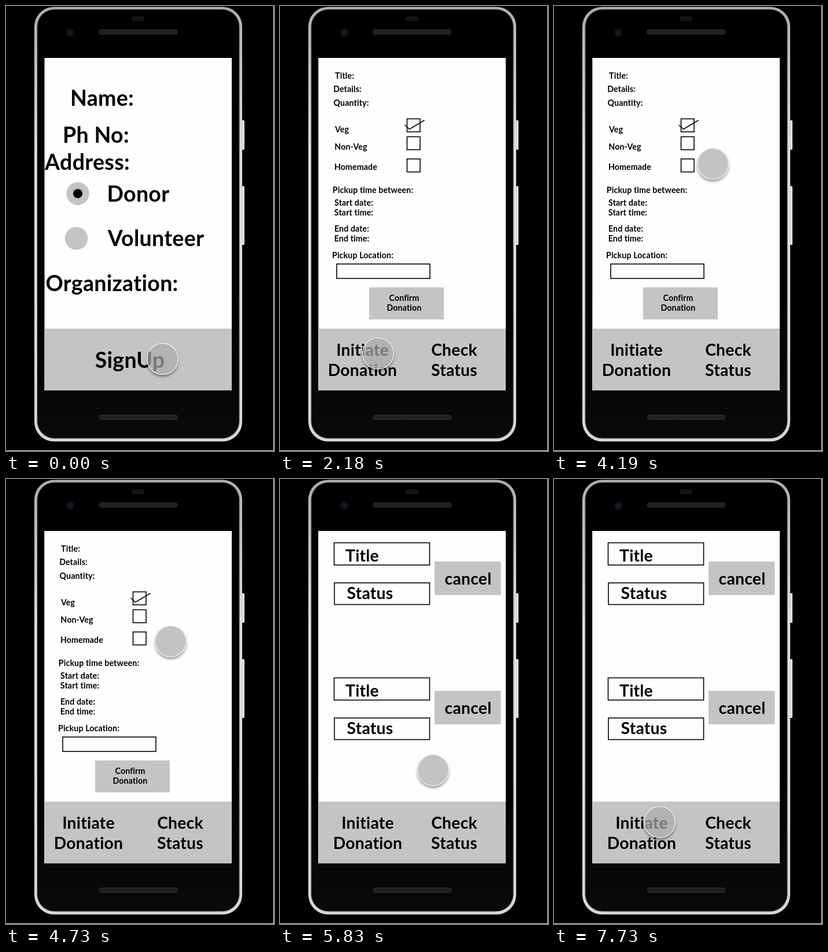
Write an HTML page with a canvas that moves like this. It is 463 px wide and 771 px high and loops after 8 s.

```html
<!DOCTYPE html>
<html lang="en">
<head>
<meta charset="utf-8">
<title>Donation app prototype</title>
<style>
html, body { margin: 0; width: 100%; height: 100%; overflow: hidden; background: #000; }
canvas { display: block; width: 463px; height: 771px; }
</style>
</head>
<body>
<canvas id="stage" width="463" height="771"></canvas>
<script>
const W = 463, H = 771, LOOP = 8000, BEAT = 140;
const GREY = '#c4c4c4';
const SMALL = 14.2, MEDIUM = 28.3, LARGE = 37.5;
const ctx = document.getElementById('stage').getContext('2d');

function layer(paint) {
  const c = document.createElement('canvas');
  c.width = W;
  c.height = H;
  paint(c.getContext('2d'));
  return c;
}

function label(g, text, x, base, size) {
  g.font = `700 ${size}px Lato, "Open Sans", sans-serif`;
  g.letterSpacing = size / 120 + 'px'; // also turns ligatures off
  g.textAlign = 'center';
  g.fillStyle = '#000';
  g.fillText(text, x, base);
}

function block(g, x, y, w, h, color = GREY) {
  g.fillStyle = color;
  g.fillRect(x, y, w, h);
}

function box(g, x, y, w, h) {
  g.strokeStyle = '#000';
  g.lineWidth = 1.6;
  g.strokeRect(x + 0.5, y + 0.5, w - 1, h - 1);
}

function disc(g, x, y, r, color) {
  g.fillStyle = color;
  g.beginPath();
  g.arc(x, y, r, 0, Math.PI * 2);
  g.fill();
}

function pill(g, x, y, w, h, r, fill) {
  g.fillStyle = fill;
  g.beginPath();
  g.roundRect(x, y, w, h, r);
  g.fill();
}

function fade(g, ...colors) {
  const shade = g.createLinearGradient(0, 0, 0, 755);
  colors.forEach((c, i) => shade.addColorStop(i / (colors.length - 1), c));
  return shade;
}

function paper(g) {
  block(g, 66.5, 90, 323.5, 576, '#fefefe');
  block(g, 66.5, 559, 323.5, 107);
}

function nav(g, x) {
  label(g, 'Initiate', x, 606, MEDIUM);
  label(g, 'Donation', x, 641, MEDIUM);
  label(g, 'Check', 301, 606, MEDIUM);
  label(g, 'Status', 301, 641, MEDIUM);
}

const phone = layer(g => {
  block(g, 0, 0, W, H, '#f4f4f4');
  block(g, 0, 0, W - 1, H - 1, '#000');

  pill(g, 406, 198, 6, 51, 1.5, '#dcdcdc');
  pill(g, 406, 312, 6, 102, 1.5, '#dcdcdc');
  pill(g, 49, 1.5, 359, 753, 34, fade(g, '#b0b0b0', '#dedede', '#dedede', '#d8d8d8'));
  pill(g, 53.5, 5.5, 350, 744, 30, '#555');
  pill(g, 54.5, 6.5, 348, 742, 29, fade(g, '#000', '#000', '#000', '#0a0a0a'));

  for (const y of [41, 708.5]) {
    pill(g, 160.5, y - 0.5, 136, 9, 4.5, '#303030');
    pill(g, 161.5, y + 0.5, 134, 7, 3.5, '#202020');
  }
  pill(g, 217, 18, 22, 8, 3, '#15151a');
  disc(g, 111, 46, 7, '#11111d');
  disc(g, 111, 46, 4, '#181830');
});

const signUp = layer(g => {
  paper(g);
  label(g, 'Name:', 166, 173, LARGE);
  label(g, 'Ph No:', 155.5, 237, LARGE);
  label(g, 'Address:', 140.5, 284, LARGE);
  disc(g, 124, 325, 19.7, GREY);
  disc(g, 124, 325, 8, '#000');
  label(g, 'Donor', 228.5, 339, LARGE);
  disc(g, 121.5, 402.5, 19.7, GREY);
  label(g, 'Volunteer', 259, 416, LARGE);
  label(g, 'Organization:', 183, 494, LARGE);
  label(g, 'SignUp', 214, 627, LARGE);
});

const form = layer(g => {
  paper(g);
  label(g, 'Title:', 111.5, 126, SMALL);
  label(g, 'Details:', 116.5, 149, SMALL);
  label(g, 'Quantity:', 123, 173, SMALL);
  label(g, 'Veg', 107, 219, SMALL);
  label(g, 'Non-Veg', 122.5, 249, SMALL);
  label(g, 'Homemade', 131, 284, SMALL);
  label(g, 'Pickup time between:', 160.5, 324, SMALL);
  label(g, 'Start date:', 127.5, 346, SMALL);
  label(g, 'Start time:', 127.5, 363, SMALL);
  label(g, 'End date:', 124, 391, SMALL);
  label(g, 'End time:', 124, 408, SMALL);
  label(g, 'Pickup Location:', 143, 437, SMALL);

  for (const y of [195, 226, 264.5]) box(g, 219, y, 23.5, 23.5);
  g.beginPath();
  g.moveTo(215.5, 206);
  g.lineTo(223.5, 213.5);
  g.lineTo(249.5, 198);
  g.stroke();

  box(g, 97.5, 446.5, 162, 26);
  block(g, 154, 487.5, 129, 55.5);
  label(g, 'Confirm', 214.5, 511, SMALL);
  label(g, 'Donation', 214.5, 528, SMALL);
  nav(g, 142.5);
});

const status = layer(g => {
  paper(g);
  for (const y of [110, 344]) {
    box(g, 93, y, 166, 39.5);
    label(g, 'Title', 142, y + 33, MEDIUM);
    box(g, 93.5, y + 69.5, 165.5, 38.5);
    label(g, 'Status', 155.5, y + 98, MEDIUM);
  }
  for (const y of [143, 367]) {
    block(g, 267, y, 114.5, 58);
    label(g, 'cancel', 325, y + 40, MEDIUM);
  }
  nav(g, 151.5);
});

// each move bends from the last stop towards `via` and ends at `to`
const home = [270.5, 611.5];
const moves = [
  { start: 1820, end: 2180, via: [222, 588], to: [169.5, 602] },
  { start: 2780, end: 3590, via: [226, 506], to: [236.5, 517.5] },
  { start: 3890, end: 4190, via: [262, 380], to: [274.5, 273.5] },
  { start: 4340, end: 5310, via: [300, 240], to: [264.5, 504.5] },
  { start: 6420, end: 7430, via: [340, 596], to: [239.5, 595] },
  { start: 7580, end: 7730, via: [211, 595], to: [182.5, 594.5] }
];

// progress from 0 to 1, held for about one beat per step
function stepped(t, start, end) {
  if (t < start) return 0;
  if (t >= end) return 1;
  const gaps = Math.round((end - start) / BEAT);
  return (Math.floor((t - start) / (end - start) * gaps) + 1) / (gaps + 1);
}

const ease = p => (1 - Math.cos(Math.PI * p)) / 2;

function place(t) {
  let from = home;
  for (const { start, end, via, to } of moves) {
    const p = ease(stepped(t, start, end));
    if (p < 1) {
      return from.map((a, i) =>
        a * (1 - p) ** 2 + via[i] * 2 * p * (1 - p) + to[i] * p ** 2);
    }
    from = to;
  }
  return from;
}

function pointer(x, y) {
  const r = 27;
  // shadow only outside the translucent disc
  ctx.save();
  ctx.beginPath();
  ctx.rect(0, 0, W, H);
  ctx.arc(x, y, r, 0, Math.PI * 2);
  ctx.clip('evenodd');
  ctx.shadowColor = 'rgba(0,0,0,0.4)';
  ctx.shadowBlur = 4;
  ctx.shadowOffsetY = 3.5;
  disc(ctx, x, y, r + 0.4, '#aaa');
  ctx.restore();

  disc(ctx, x, y, r, 'rgba(171,171,171,0.7)');
  ctx.strokeStyle = '#fff';
  ctx.lineWidth = 1.1;
  ctx.stroke();
}

function dissolve(screen, amount) {
  ctx.globalAlpha = amount;
  ctx.drawImage(screen, 0, 0);
  ctx.globalAlpha = 1;
}

function draw(t) {
  ctx.drawImage(phone, 0, 0);
  ctx.drawImage(signUp, 0, 0);
  dissolve(form, stepped(t, 810, 960));
  dissolve(status, stepped(t, 5560, 5830));
  pointer(...place(t));
}

const begin = performance.now();
function tick() {
  draw((performance.now() - begin) % LOOP);
  requestAnimationFrame(tick);
}
tick();
</script>
</body>
</html>
```
